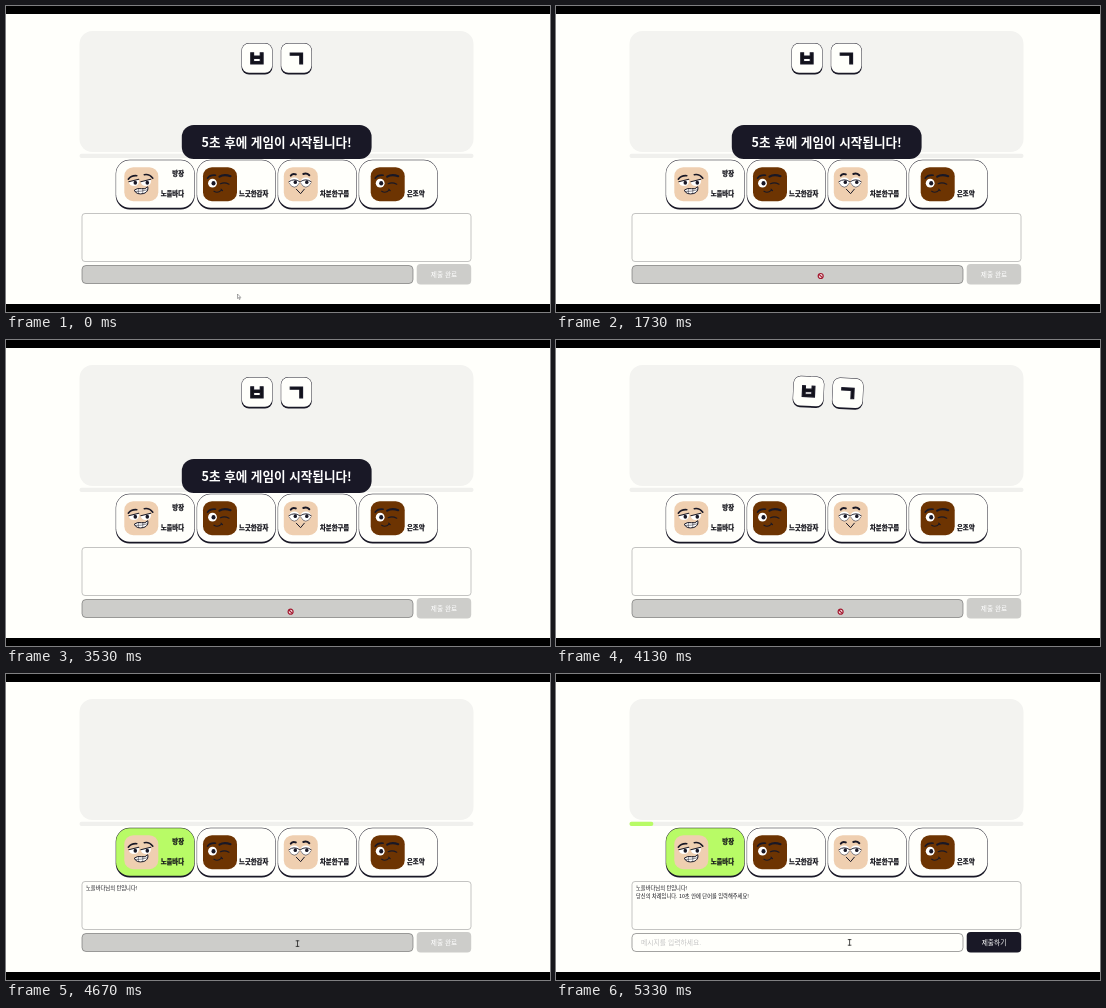
Animation of 544x306 px, one loop 5.39 s. Source, as an HTML page:

```html
<!DOCTYPE html>
<html lang="ko">
<head>
<meta charset="utf-8">
<title>초성 게임</title>
<style>
html, body { margin: 0; width: 100%; height: 100%; overflow: hidden; background: #fffffb; }
svg { display: block; width: 544px; height: 306px; }
text { font-family: "Noto Sans CJK KR", "Noto Sans CJK", sans-serif; fill: #111118; }
.bold { font-weight: 900; }
.name { font-weight: 900; stroke: #111118; stroke-width: .25px; }
.chat { font-weight: 500; }
</style>
</head>
<body>
<svg id="stage" viewBox="0 0 544 306"></svg>
<script>
const LOOP = 5390;
const INK = "#191826", PAPER = "#fffffb", GREEN = "#b8fb66", GREY = "#cdcdca";
const NS = "http://www.w3.org/2000/svg";
const stage = document.getElementById("stage");

function add(parent, tag, attrs = {}, text) {
  const node = document.createElementNS(NS, tag);
  set(node, attrs);
  if (text) node.textContent = text;
  parent.appendChild(node);
  return node;
}
function set(node, attrs) {
  for (const k in attrs) node.setAttribute(k, attrs[k]);
}
const group = (parent, attrs) => add(parent, "g", attrs);
const rect = (p, x, y, width, height, rx, fill, more) =>
  add(p, "rect", { x, y, width, height, rx, fill, ...more });
const label = (p, x, y, size, str, more) =>
  add(p, "text", { x, y, "font-size": size, ...more }, str);
const line = (p, d, width, stroke = INK) =>
  add(p, "path", { d, fill: "none", stroke, "stroke-width": width, "stroke-linecap": "round" });
const oval = (p, cx, cy, rx, ry, fill) => add(p, "ellipse", { cx, cy, rx, ry, fill });
const show = (node, on) => node.setAttribute("visibility", on ? "visible" : "hidden");

// Dark rounded slab with a lighter face and a thick lower edge
function slab(p, x, y, w, h, r) {
  rect(p, x, y, w, h, r, INK);
  return rect(p, x + .4, y + .4, w - .8, h - 2.1, r - .4, PAPER);
}

// Faces, drawn on a 34 x 34 square
const faces = {
  nervous(g) {
    rect(g, 0, 0, 34, 34, 9, "#efcfb0");
    line(g, "M4 12Q7 8 12.5 8.5", 1.6);
    line(g, "M20 7.5Q25 6.5 28.5 11", 1.6);
    for (const x of [9.5, 21.5]) {
      add(g, "path", { d: `M${x - 5} 14.5L${x + 5} 12Q${x + 6} 18.5 ${x + .5} 18.8Q${x - 4.5} 18.8 ${x - 5} 14.5Z`, fill: "#fff" });
      line(g, `M${x - 5} 14.5L${x + 5} 12`, 1.1);
      oval(g, x + 1.5, 15.5, 1.8, 2, INK);
    }
    add(g, "path", { d: "M10 23Q13 20.5 17 21.5T23.5 19.5Q24.5 24.5 19.5 26.3Q12 28 10 23Z", fill: "#fff", stroke: INK, "stroke-width": 1 });
    line(g, "M11 24.3Q17 24.5 23 22.6M14 22V26M18.5 21.5V26", .5);
  },
  wink(g) {
    rect(g, 0, 0, 34, 34, 9, "#6d3402");
    line(g, "M4.5 11Q7 7.5 12.5 8", 1.6);
    line(g, "M16.5 9.5Q21 6.5 27.5 9", 2.2);
    oval(g, 9.5, 16, 4.4, 4.4, "#fff");
    oval(g, 10.5, 16, 2, 2.2, INK);
    line(g, "M17.5 16.5Q21.5 14.5 26 17", 1.2);
    line(g, "M11 24Q14.5 26.5 18.5 23M18 22L19.5 23.5", 1.1);
  },
  sleepy(g) {
    rect(g, 0, 0, 34, 34, 9, "#efcfb0");
    line(g, "M7 8.5Q9 5.8 12 7.2", 2);
    line(g, "M19.5 6.8Q23 5.5 25.5 8", 2);
    for (const x of [10.5, 22]) {
      oval(g, x, 15, 5.2, 4.8, "#fff");
      line(g, `M${x - 5.4} 14.5Q${x} 10.5 ${x + 5.4} 14.5`, .9);
      line(g, `M${x - 5} 16Q${x - 3} 20 ${x} 20T${x + 5} 16`, .5);
      oval(g, x + 1, 15, 1.7, 1.9, INK);
    }
    line(g, "M12.5 22L16.8 26.5L20.5 22", 1);
  }
};

// Static board
rect(stage, 0, 0, 544, 306, 0, PAPER);
rect(stage, 73.5, 25, 394, 121, 13, "#f3f3f0");
rect(stage, 73.5, 147.7, 394, 4.3, 2, "#f0f0ed");
const bar = rect(stage, 73.5, 147.7, 0, 4.3, 2, GREEN);

const players = [
  ["노을바다", "nervous", 118.3, 178],
  ["느긋한감자", "wink", 197, 262.3],
  ["차분한구름", "sleepy", 277.8, 343.2],
  ["은조약", "wink", 364.7, 418.5]
];
const cards = players.map(([name, face, fx, right], i) => {
  const card = slab(stage, 109.7 + 81 * i, 153.8, 79, 49.7, 14);
  faces[face](group(stage, { transform: `translate(${fx} 161.2)` }));
  label(stage, right, 190.3, 6.35, name, { class: "name", "text-anchor": "end" });
  return card;
});
label(stage, 178, 170.3, 6.35, "방장", { class: "name", "text-anchor": "end" });

rect(stage, 76, 207.5, 389, 48, 3, PAPER, { stroke: "#888", "stroke-width": .5 });
const turnLine = label(stage, 80, 216.2, 5.25, "노을바다님의 턴입니다!", { class: "chat" });
const askLine = label(stage, 80, 224.2, 5.25, "당신의 차례입니다. 10초 안에 단어를 입력해주세요!", { class: "chat" });

const field = rect(stage, 76, 259.5, 331, 18, 4, GREY, { stroke: "#666", "stroke-width": .6 });
const hint = label(stage, 85, 270.6, 6.8, "메시지를 입력하세요.", { style: "fill:#c4c4c4" });
const button = rect(stage, 410.7, 258, 54.5, 20.6, 4, GREY);
const buttonText = label(stage, 438, 270.6, 6.7, "", { "text-anchor": "middle", style: "fill:#fff" });

// Letter tiles share one group so they roll away together
const tiles = group(stage);
["ㅂ", "ㄱ"].forEach((ch, i) => {
  const x = 235.5 + 39.3 * i;
  slab(tiles, x, 37, 31, 31.5, 7.5);
  label(tiles, x + 15.5, 60.4, 21, ch, {
    class: "bold", "text-anchor": "middle", stroke: INK, "stroke-width": 1.2
  });
});

const banner = group(stage);
rect(banner, 175.8, 119, 189.8, 34, 12, INK);
label(banner, 270.7, 140.6, 12.6, "5초 후에 게임이 시작됩니다!", {
  class: "bold", "text-anchor": "middle", style: "fill:#fff"
});

// Pointer shapes, centred on their own origin
const arrow = group(stage);
add(arrow, "path", { d: "M-1.5 -2.5V2L-.4 1.1L.4 3L1.2 2.6L.4 .9H1.8Z", fill: "#fff", stroke: "#555", "stroke-width": .5 });
const blocked = group(stage);
add(blocked, "circle", { r: 2.5, fill: "#f3dede", stroke: "#a3182f", "stroke-width": 1.2 });
line(blocked, "M-1.7 -1.7L1.7 1.7", 1.1, "#a3182f");
const beam = group(stage);
line(beam, "M-1.4 -2.8H1.4M0 -2.8V2.8M-1.4 2.8H1.4", .8, "#222");

rect(stage, 0, 0, 544, 8, 0, "#000");
rect(stage, 0, 298, 544, 8, 0, "#000");

const path = [
  [0, 233, 290.5], [130, 234, 289], [330, 248, 274], [530, 252.6, 272.5],
  [730, 253, 274], [930, 254.5, 271.5], [1130, 257, 271], [1330, 257, 271],
  [1530, 261, 270.5], [1730, 264.7, 270], [1930, 267, 270], [2130, 269, 272],
  [2330, 274, 271], [2530, 281, 270], [2670, 284, 270], [3330, 283.5, 270],
  [3530, 284.6, 271.7], [4330, 284.6, 271.7], [4670, 291.5, 269.6], [5330, 293.6, 268.4]
];
function pointerAt(t) {
  const i = path.findIndex(p => p[0] > t);
  if (i < 0) return path[path.length - 1].slice(1);
  const a = path[i - 1], b = path[i], k = (t - a[0]) / (b[0] - a[0]);
  return [a[1] + (b[1] - a[1]) * k, a[2] + (b[2] - a[2]) * k];
}

// CSS "ease": cubic-bezier(.25, .1, .25, 1)
function ease(x) {
  if (x <= 0) return 0;
  if (x >= 1) return 1;
  const curve = (u, a, b) => 3 * u * (1 - u) * (1 - u) * a + 3 * u * u * (1 - u) * b + u ** 3;
  let lo = 0, hi = 1;
  for (let i = 0; i < 24; i++) {
    const mid = (lo + hi) / 2;
    if (curve(mid, .25, .25) < x) lo = mid; else hi = mid;
  }
  return curve(lo, .1, 1);
}

// The picture advances in alternating 60 and 140 ms holds
function hold(t) {
  if (t < 70) return 0;
  const base = 70 + Math.floor((t - 70) / 200) * 200;
  return t - base >= 60 ? base + 60 : base;
}

function draw(time) {
  const t = hold(time);
  const roll = ease((t - 4110) / 540);
  const turn = t >= 4670, open = t >= 4730;

  show(banner, t < 4130);
  set(tiles, {
    transform: `translate(${68 * roll} 0) rotate(${121 * roll} 270.6 52.5)`,
    opacity: 1 - roll ** 5
  });

  cards[0].setAttribute("fill", turn ? GREEN : PAPER);
  show(turnLine, turn);
  show(askLine, t >= 4930);
  bar.setAttribute("width", open ? Math.max(0, (t - 4770) * .0425) : 0);

  field.setAttribute("fill", open ? PAPER : GREY);
  show(hint, open);
  button.setAttribute("fill", open ? INK : GREY);
  buttonText.textContent = open ? "제출하기" : "제출 완료";

  const [x, y] = pointerAt(t);
  for (const p of [arrow, blocked, beam]) p.setAttribute("transform", `translate(${x} ${y})`);
  show(arrow, t < 330);
  show(blocked, t >= 330 && !turn);
  show(beam, turn);
}

const start = performance.now();
function tick() {
  draw((performance.now() - start) % LOOP);
  requestAnimationFrame(tick);
}
tick();
</script>
</body>
</html>
```
